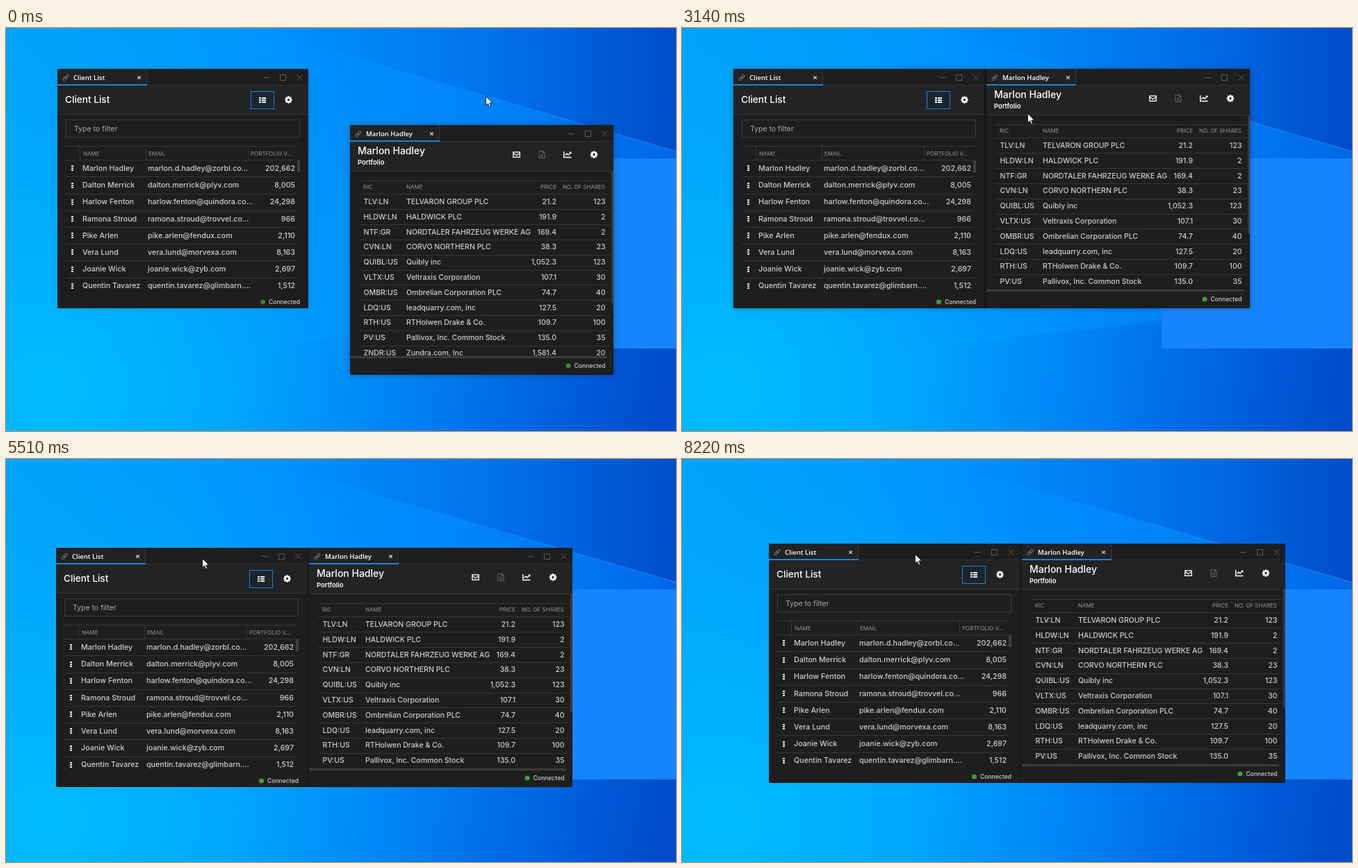
Animation of 964x581 px, one loop 8.82 s. Source, as an HTML page with a canvas:

```html
<!DOCTYPE html>
<html lang="en">
<head>
<meta charset="utf-8">
<title>Docking windows</title>
<style>
  html, body { margin: 0; width: 100%; height: 100%; overflow: hidden; background: #0084fa; }
  canvas { display: block; }
</style>
</head>
<body>
<canvas id="stage" width="964" height="581"></canvas>
<script>
const W = 964, H = 581, LOOP = 8820;
const c = document.getElementById('stage').getContext('2d');
const UI = 'Inter, sans-serif', TAB = '"Open Sans", sans-serif';
const BODY = '#1e1e1e', HEAD = '#232323', LINE = '#363636', BLUE = '#1f82d6';

const clients = [
  ['Marlon Hadley', 'marlon.d.hadley@zorbl.co...', '202,662'],
  ['Dalton Merrick', 'dalton.merrick@plyv.com', '8,005'],
  ['Harlow Fenton', 'harlow.fenton@quindora.co...', '24,298'],
  ['Ramona Stroud', 'ramona.stroud@trovvel.co...', '966'],
  ['Pike Arlen', 'pike.arlen@fendux.com', '2,110'],
  ['Vera Lund', 'vera.lund@morvexa.com', '8,163'],
  ['Joanie Wick', 'joanie.wick@zyb.com', '2,697'],
  ['Quentin Tavarez', 'quentin.tavarez@glimbarn....', '1,512']
];
const holdings = [
  ['TLV:LN', 'TELVARON GROUP PLC', '21.2', '123'],
  ['HLDW:LN', 'HALDWICK PLC', '191.9', '2'],
  ['NTF:GR', 'NORDTALER FAHRZEUG WERKE AG', '169.4', '2'],
  ['CVN:LN', 'CORVO NORTHERN PLC', '38.3', '23'],
  ['QUIBL:US', 'Quibly inc', '1,052.3', '123'],
  ['VLTX:US', 'Veltraxis Corporation', '107.1', '30'],
  ['OMBR:US', 'Ombrelian Corporation PLC', '74.7', '40'],
  ['LDQ:US', 'leadquarry.com, inc', '127.5', '20'],
  ['RTH:US', 'RTHolwen Drake & Co.', '109.7', '100'],
  ['PV:US', 'Pallivox, Inc. Common Stock', '135.0', '35'],
  ['ZNDR:US', 'Zundra.com, Inc', '1,581.4', '20']
];

// Paths as [time, x, y]
const portfolioPath = [[810, 495, 140], [1200, 474, 104], [1640, 449, 69], [2190, 447, 65], [2399, 447, 65]];
const groupPath = [
  [3760, 74, 59], [3830, 76, 62], [4250, 81, 66], [4600, 126, 96], [4800, 135, 80],
  [5000, 110, 65], [5250, 59, 85], [5510, 72, 128], [5800, 115, 109], [6150, 173, 120],
  [6420, 135, 154], [6620, 80, 167], [6830, 33, 150], [7050, 92, 154], [7330, 171, 129],
  [7480, 173, 146], [7750, 140, 146], [7950, 120, 130], [8090, 122, 115], [8220, 125, 122]
];
const approachPath = [[70, 690, 98], [610, 679, 150]];
const returnPath = [[2800, 632, 78], [3200, 470, 126], [3630, 286, 78]];

// Monotone cubic interpolation: smooth, never overshoots its keys
function along(path, t) {
  const last = path.length - 1;
  if (t <= path[0][0]) return path[0].slice(1);
  if (t >= path[last][0]) return path[last].slice(1);
  const i = path.findIndex(k => k[0] > t) - 1;
  const slope = (j, d) => (path[j + 1][d] - path[j][d]) / (path[j + 1][0] - path[j][0]);
  const tangent = (j, d) => {
    if (j === 0 || j === last) return 0;
    const a = slope(j - 1, d), b = slope(j, d);
    return a * b > 0 ? 2 * a * b / (a + b) : 0;
  };
  const span = path[i + 1][0] - path[i][0], u = (t - path[i][0]) / span, v = 1 - u;
  return [1, 2].map(d => Math.round(
    path[i][d] * (1 + 2 * u) * v * v + tangent(i, d) * span * u * v * v +
    path[i + 1][d] * u * u * (3 - 2 * u) - tangent(i + 1, d) * span * u * u * v));
}

function rect(x, y, w, h, fill) { c.fillStyle = fill; c.fillRect(x, y, w, h); }
function frame(x, y, w, h, stroke) {
  c.strokeStyle = stroke; c.lineWidth = 1;
  c.strokeRect(x + .5, y + .5, w - 1, h - 1);
}
function text(s, x, midY, size, { fill = '#cfcfcf', weight = 500, font = UI, right = false } = {}) {
  c.font = `${weight} ${size}px ${font}`;
  c.textAlign = right ? 'right' : 'left';
  c.fillStyle = fill;
  c.fillText(s, x, midY + size * .35);
}
function line(points, stroke, width = 1) {
  c.strokeStyle = stroke; c.lineWidth = width;
  c.beginPath();
  points.forEach(p => c.lineTo(...p));
  c.stroke();
}
function poly(points, fill) {
  c.fillStyle = fill;
  c.beginPath();
  points.forEach(p => c.lineTo(...p));
  c.fill();
}
function dot(x, y, r, fill) {
  c.fillStyle = fill;
  c.beginPath(); c.arc(x, y, r, 0, 7); c.fill();
}
function gradient(coords, ...stops) {
  const g = coords.length === 6 ? c.createRadialGradient(...coords) : c.createLinearGradient(...coords);
  stops.forEach(([at, color]) => g.addColorStop(at, color));
  return g;
}

function wallpaper() {
  rect(0, 0, W, H, gradient([0, 0, W, 0], [0, '#00a2f8'], [.3, '#0098fe'], [.55, '#008afc'], [.8, '#0076f0'], [1, '#005cda']));
  rect(0, 0, W, H, gradient([60, 520, 0, 60, 520, 620], [0, '#00bcff'], [1, '#00a8ff00']));
  poly([[355, 0], [W, 178], [W, 445], [690, 420], [0, 490], [0, 60]],
    gradient([250, 0, 900, 0], [0, '#0090ff00'], [.6, '#0090ff60'], [1, '#007cff60']));
  poly([[355, 0], [W, 178], [W, 0]], gradient([400, 0, W, 0], [0, '#0058d000'], [.5, '#0058d040'], [1, '#0044c0a0']));
  poly([[0, 490], [690, 425], [W, 462], [W, H], [0, H]],
    gradient([380, 380, 940, 560], [0, '#0054d000'], [.5, '#0054d040'], [1, '#0044c4b0']));
  line([[355, 0], [W, 178]], gradient([355, 0, W, 178], [0, '#30a0ff00'], [1, '#30a0ff90']), 1.2);
  rect(690, 188, 274, 274, '#1684fa');
}

function gear(x, y) {
  c.strokeStyle = '#fff';
  c.lineWidth = 2.6;
  c.beginPath(); c.arc(x, y, 3, 0, 7); c.stroke();
  c.lineWidth = 2.2;
  for (let a = 0; a < 8; a++) {
    const dx = Math.cos(a * Math.PI / 4), dy = Math.sin(a * Math.PI / 4);
    c.beginPath(); c.moveTo(x + dx * 3.5, y + dy * 3.5); c.lineTo(x + dx * 5.3, y + dy * 5.3); c.stroke();
  }
}
function mailIcon(x, y) {
  c.strokeStyle = '#fff'; c.lineWidth = 1.3;
  c.strokeRect(x - 4.7, y - 3.6, 9.4, 7.4);
  line([[x - 4.5, y - 2], [x, y + 1.3], [x + 4.5, y - 2]], '#fff', 1.3);
}
function sheetIcon(x, y) {
  const gray = '#626262';
  line([[x + 1.5, y - 5], [x - 4, y - 5], [x - 4, y + 5], [x + 4, y + 5], [x + 4, y - 2.5],
    [x + 1.5, y - 5], [x + 1.5, y - 2.5], [x + 4, y - 2.5]], gray, 1.1);
  line([[x - 1.8, y - .5], [x + 1.8, y + 3.5]], gray, 1.1);
  line([[x + 1.8, y - .5], [x - 1.8, y + 3.5]], gray, 1.1);
}
function chartIcon(x, y) {
  line([[x - 5.3, y - 4.5], [x - 5.3, y + 4], [x + 5.5, y + 4]], '#fff', 1.4);
  line([[x - 3.5, y + 1], [x - 1, y - 1.5], [x + 1, y + .5], [x + 4.5, y - 3]], '#fff', 1.5);
  poly([[x + 2, y - 4], [x + 5.4, y - 4], [x + 5.4, y - .6]], '#fff');
}
function linkIcon(x, y) {
  c.strokeStyle = '#8a8a8a'; c.lineWidth = 1;
  for (const s of [-1, 1]) {
    c.beginPath(); c.ellipse(x + s * 1.6, y - s * 1.6, 2.8, 1.7, -Math.PI / 4, 0, 7); c.stroke();
  }
}
function cross(x, y, r, stroke, width) {
  line([[x - r, y - r], [x + r, y + r]], stroke, width);
  line([[x - r, y + r], [x + r, y - r]], stroke, width);
}

// Shared window chrome; content draws in window coordinates
function openWindow([x, y], w, h, title, headBottom, shadow) {
  c.save();
  c.translate(x, y);
  c.shadowColor = `rgba(0,0,0,${shadow})`;
  c.shadowBlur = 8;
  rect(0, 0, w, h, BODY);
  c.shadowColor = 'transparent';
  c.beginPath(); c.rect(0, 0, w, h); c.clip();
  rect(0, 24, w, headBottom - 24, HEAD);
  rect(0, headBottom - 1, w, 1, LINE);
  rect(129, 23, w - 129, 1, '#303030');
  rect(0, 0, 129, 24, '#222');
  rect(128, 0, 1, 22, '#383838');
  rect(0, 22, 129, 2, BLUE);
  linkIcon(12, 12.5);
  text(title, 23, 12.7, 9.5, { fill: '#fff', weight: 600, font: TAB });
  cross(117.5, 12.5, 2.2, '#eee', 1.1);
  rect(w - 65, 12, 9, 1, '#5a5a5a');
  frame(w - 41, 8, 9, 9, '#5a5a5a');
  cross(w - 12.5, 12.5, 4, '#5a5a5a', 1);
}
function status(dotX, right, y, live) {
  dot(dotX, y, 3.6, live ? '#3f9b42' : '#437b47');
  text('Connected', right, y, 8.6, { right: true });
}
const label = (s, x, y, right) => text(s, x, y, 8, { fill: '#999', weight: 400, right });

function clientWindow(pos, { shadow, live, snapping }) {
  const w = 361, h = 345;
  openWindow(pos, w, h, 'Client List', 66, shadow);
  text('Client List', 11, 44, 13.6, { fill: '#fff' });
  rect(278, 32, 34, 26, '#1b2530');
  frame(278, 32, 34, 26, BLUE);
  for (let i = 0; i < 3; i++) {
    rect(290, 41 + i * 3, 3, 2, '#fff');
    rect(294, 41 + i * 3, 6, 2, '#fff');
  }
  gear(332.5, 44.5);
  frame(12, 73, 337, 26, '#3a3a3a');
  text('Type to filter', 24, 86, 10.5, { fill: '#aaa', weight: 400 });

  rect(12, 111, 334, 1, LINE);
  rect(12, 131, 334, 1, LINE);
  [32, 127, 274].forEach(x => rect(x, 112, 1, 19, LINE));
  label('NAME', 37, 122);
  label('EMAIL', 131, 122);
  label('PORTFOLIO V...', 278, 122);
  clients.forEach(([name, email, value], i) => {
    const y = 143.3 + 24.2 * i;
    for (let d = -1; d < 2; d++) rect(20, Math.round(y) - 1 + d * 3, 3, 2, '#eee');
    text(name, 36, y, 10.7);
    text(email, 130, y, 10.7);
    text(value, 342, y, 10.7, { right: true });
    if (i < 7) rect(12, Math.round(y + 12), 334, 1, LINE);
  });
  rect(345, 132, 4, 17, '#404040');
  status(295.5, 349, 336, live);
  if (snapping) rect(w - 3, 0, 3, h, '#0a6fd0');
  c.restore();
}

function portfolioWindow(pos, h, { shadow, live, snapping }) {
  const w = 379, floor = h - 27;
  openWindow(pos, w, h, 'Marlon Hadley', 67, shadow);
  text('Marlon Hadley', 11, 37, 14, { fill: '#fff' });
  text('Portfolio', 11, 54, 9.4, { fill: '#fff', weight: 600 });
  mailIcon(239.5, 42.5);
  sheetIcon(276, 42.5);
  chartIcon(313, 42.5);
  gear(351, 42.5);

  c.save();
  c.beginPath(); c.rect(0, 66, w, floor - 66); c.clip();
  rect(13, 80, 362, 1, LINE);
  rect(13, 99, 362, 1, LINE);
  label('RIC', 19, 89);
  label('NAME', 81, 89);
  label('PRICE', 297, 89, true);
  label('NO. OF SHARES', 367, 89, true);
  holdings.forEach(([ric, name, price, shares], i) => {
    const y = 110.3 + 21.8 * i;
    text(ric, 19.5, y, 10.5);
    text(name, 81, y, 10.5);
    text(price, 297, y, 10.5, { right: true });
    text(shares, 367.5, y, 10.5, { right: true });
    rect(13, Math.round(y + 11), 362, 1, LINE);
  });
  c.restore();
  rect(376, 67, 3, h === 360 ? 190 : 170, '#3a3a3a');
  rect(0, floor, 370, 3, '#3c3c3c');
  status(314, 367.5, h - 13, live);
  if (snapping) rect(0, 0, 3, h, '#0a6fd0');
  c.restore();
}

function pointer([x, y]) {
  c.save();
  c.translate(x + .5, y + .5);
  c.beginPath();
  [[0, 0], [0, 13], [3, 10.3], [5, 15], [7.2, 14], [5.2, 9.6], [9.3, 9.3]].forEach(p => c.lineTo(...p));
  c.closePath();
  c.fillStyle = '#fff'; c.fill();
  c.strokeStyle = '#111'; c.lineWidth = .9; c.stroke();
  c.restore();
}

function draw(t) {
  const docked = t >= 2400, grouped = t >= 3830, dragging = t >= 810 && !docked;
  const snapping = t >= 1570 && !docked;
  const resting = grouped ? 0 : .3;
  const client = along(groupPath, t);
  const portfolio = docked ? [client[0] + 364, client[1]] : along(portfolioPath, t);

  wallpaper();
  if (docked) rect(client[0] + 361, client[1], 3, 345, '#1a1a1a');
  clientWindow(client, { snapping, live: docked, shadow: docked ? resting : .12 });
  portfolioWindow(portfolio, docked ? 345 : 360, { snapping, live: t >= 810, shadow: dragging ? 0 : resting });

  let tip;
  if (t < 810) tip = along(approachPath, t);
  else if (dragging) {
    const settle = Math.min(1, (t - 810) / 830);
    tip = [portfolio[0] + 184 + settle, portfolio[1] + 10 + 3 * settle];
  } else if (!grouped) tip = along(returnPath, t);
  else tip = [client[0] + 210, client[1] + 15];
  pointer(tip);
}

const start = performance.now();
function tick() {
  draw((performance.now() - start) % LOOP);
  requestAnimationFrame(tick);
}
tick();
</script>
</body>
</html>
```
